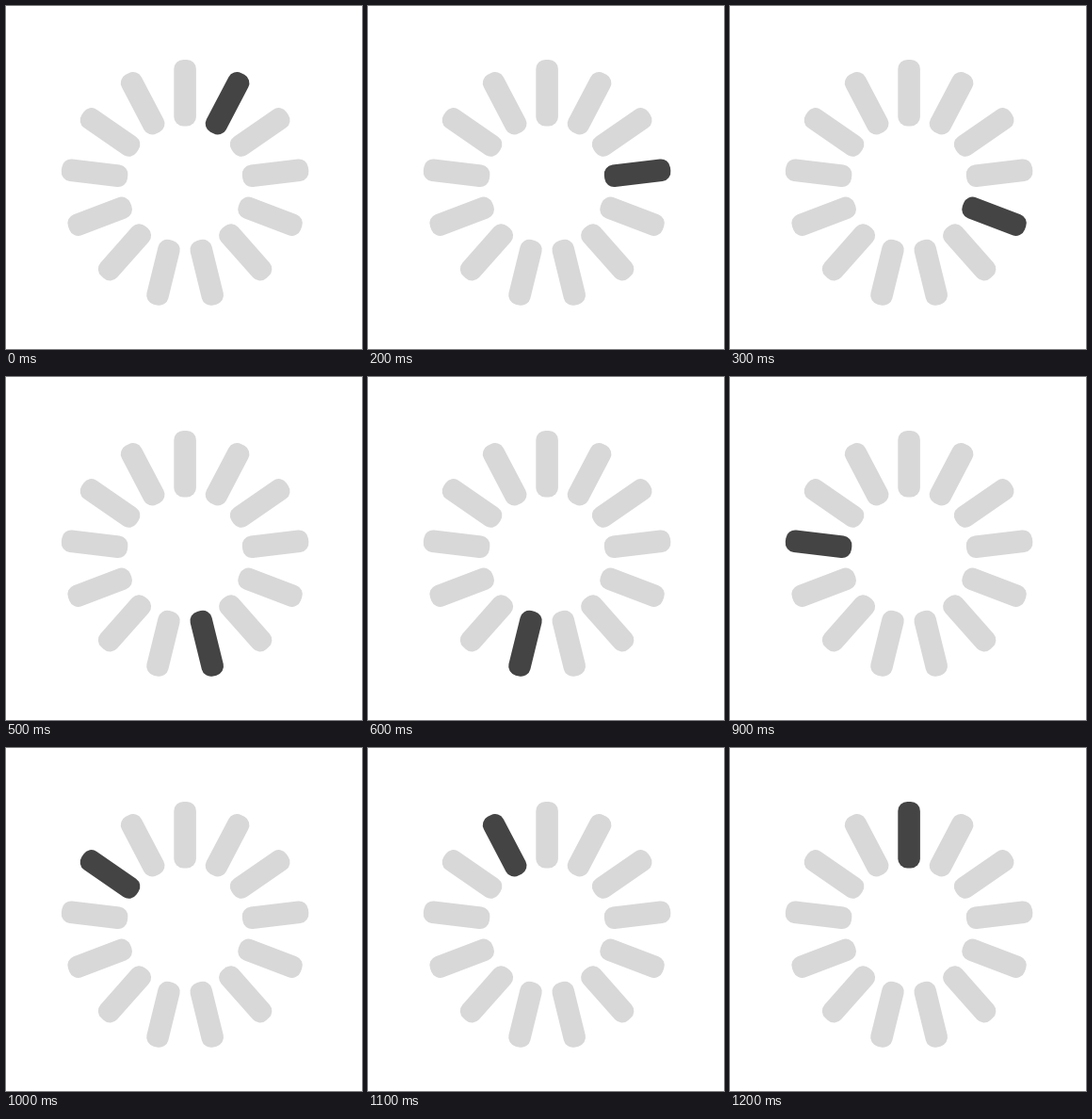
Write an HTML page that moves like this. It is 378 px wide and 364 px high and loops after 1300 ms.

```html
<!DOCTYPE html>
<html lang="en">
<head>
<meta charset="utf-8">
<title>Spinner</title>
<style>
  html, body { margin: 0; width: 100%; height: 100%; overflow: hidden; background: #fff; }
  svg { display: block; }
</style>
</head>
<body>
<svg width="378" height="364" viewBox="0 0 378 364"></svg>
<script>
  const COUNT = 13, STEP = 100, RADIUS = 96.7;
  const WIDTH = 23.6, LENGTH = 70.6;
  const IDLE = '#d8d8d8', ACTIVE = '#444';

  const svg = document.querySelector('svg');

  function addBar(_, i) {
    const bar = document.createElementNS(svg.namespaceURI, 'rect');
    const attrs = {
      x: -WIDTH / 2, y: -RADIUS - LENGTH / 2, width: WIDTH, height: LENGTH, rx: 10,
      transform: `translate(190.1 188.9) rotate(${i * 360 / COUNT})`
    };
    for (const name in attrs) bar.setAttribute(name, attrs[name]);
    return svg.appendChild(bar);
  }

  const bars = Array.from({ length: COUNT }, addBar);
  const start = performance.now();

  function draw() {
    const elapsed = Math.max(0, performance.now() - start);
    const active = (Math.floor(elapsed / STEP) + 1) % COUNT;
    bars.forEach((bar, i) => bar.setAttribute('fill', i === active ? ACTIVE : IDLE));
    requestAnimationFrame(draw);
  }
  draw();
</script>
</body>
</html>
```
